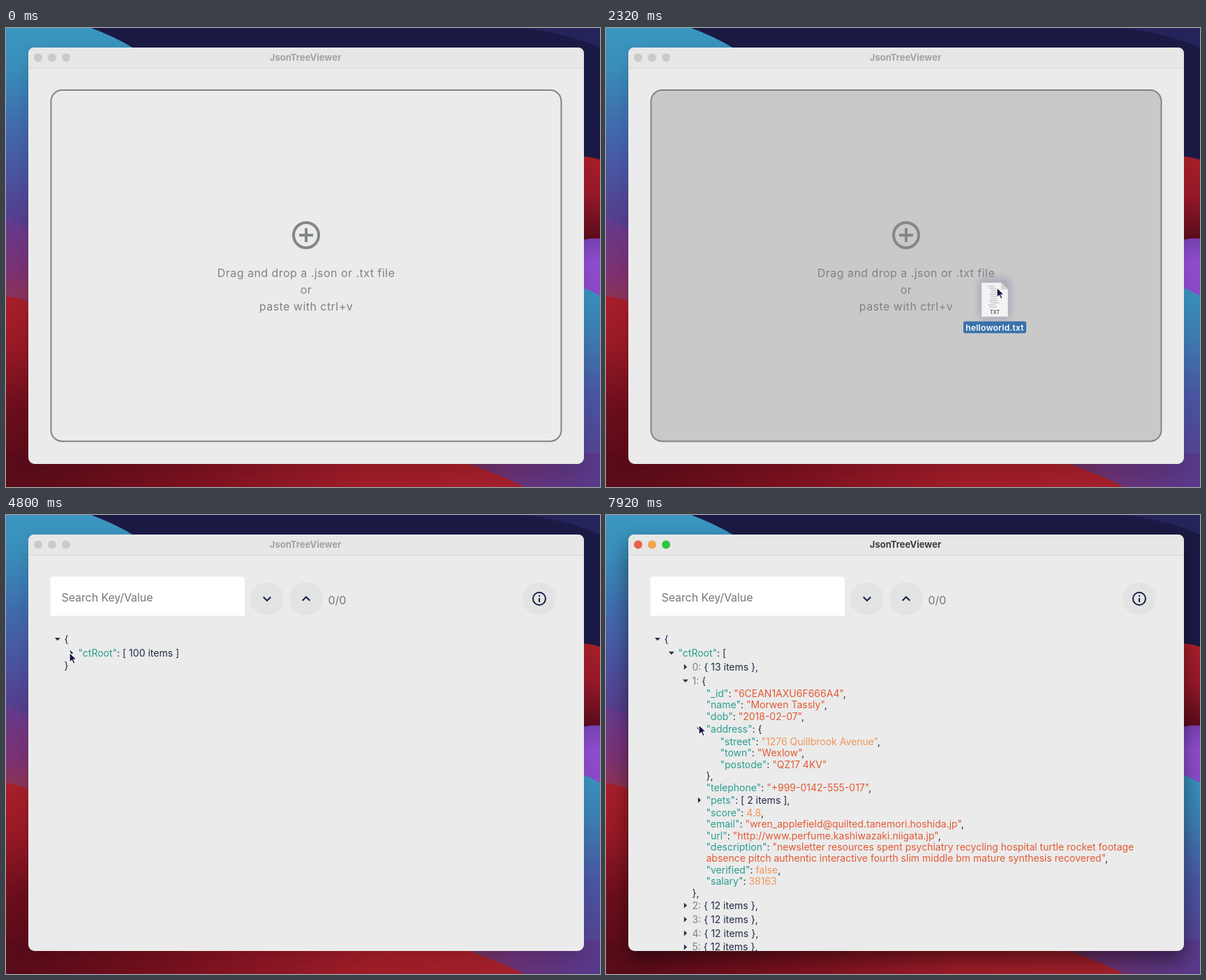
Recreate the animation shown at these times as an HTML page. Size 851 by 658 pixels, loop 8000 ms.

```html
<!DOCTYPE html>
<html lang="en">
<head>
<meta charset="utf-8">
<title>JsonTreeViewer</title>
<style>
html, body { margin: 0; width: 100%; height: 100%; overflow: hidden; background: #1b1a45; }
svg { display: block; width: 851px; height: 658px; font-family: Inter, "Open Sans", sans-serif; }
.prompt text { font-size: 16px; letter-spacing: .46px; fill: #7e8286; text-anchor: middle; }
.title { font-size: 13px; font-weight: 700; text-anchor: middle; fill: #a1a1a5; }
.light { fill: #cacaca; }
.focused .title { fill: #3d3d40; }
.focused .l0 { fill: #e8604b; }
.focused .l1 { fill: #f0a452; }
.focused .l2 { fill: #2ec63f; }
.field { font-size: 16px; fill: #74787b; letter-spacing: -.1px; }
#tree text { font-size: 14px; fill: #1f2d45; }
#tree path { fill: #22344c; }
#tree .k { fill: #2a9d8f; }
#tree .i { fill: #7b8189; }
#tree .s { fill: #e25a34; }
#tree .n { fill: #f0965a; }
.icon { fill: none; stroke: #1d1b44; stroke-width: 2; }
</style>
</head>
<body>
<svg viewBox="0 0 851 658">
  <defs>
    <linearGradient id="left" x2="0" y2="1">
      <stop offset="0" stop-color="#3a97c0"/><stop offset=".2" stop-color="#398dba"/>
      <stop offset=".44" stop-color="#3f6eae"/><stop offset=".7" stop-color="#4a53a0"/>
      <stop offset=".96" stop-color="#583b8b"/>
    </linearGradient>
    <linearGradient id="magenta" x2="0" y2="1">
      <stop offset="0" stop-color="#653b8e"/><stop offset=".6" stop-color="#7d3173"/><stop offset="1" stop-color="#90344f"/>
    </linearGradient>
    <linearGradient id="redLeft" x2="0" y2="1">
      <stop offset="0" stop-color="#a81f2a"/><stop offset=".25" stop-color="#9a1a26"/>
      <stop offset=".6" stop-color="#6b0e1c"/><stop offset="1" stop-color="#560a18"/>
    </linearGradient>
    <linearGradient id="floor">
      <stop offset="0" stop-color="#580b19"/><stop offset=".3" stop-color="#7b111f"/>
      <stop offset=".6" stop-color="#a01d29"/><stop offset="1" stop-color="#a9222d"/>
    </linearGradient>
    <linearGradient id="redRight" x2="0" y2="1">
      <stop offset="0" stop-color="#ab202a"/><stop offset=".45" stop-color="#98192a"/><stop offset="1" stop-color="#540a19"/>
    </linearGradient>
    <linearGradient id="violet" x2="0" y2="1">
      <stop offset="0" stop-color="#7742b4"/><stop offset=".4" stop-color="#914dd0"/><stop offset="1" stop-color="#8a49c6"/>
    </linearGradient>
    <linearGradient id="right" x2="0" y2="1">
      <stop offset="0" stop-color="#3995be"/><stop offset=".2" stop-color="#3c83b6"/>
      <stop offset=".55" stop-color="#4a55a2"/><stop offset="1" stop-color="#5a3b8c"/>
    </linearGradient>
    <linearGradient id="corner">
      <stop offset="0" stop-color="#74304f"/><stop offset=".4" stop-color="#6b3277"/><stop offset="1" stop-color="#573a8b"/>
    </linearGradient>
    <filter id="shade" x="-10%" y="-10%" width="120%" height="120%"><feGaussianBlur stdDeviation="14"/></filter>
    <filter id="glow" x="-50%" y="-50%" width="200%" height="200%"><feGaussianBlur stdDeviation="4"/></filter>
    <clipPath id="inside"><rect x="32" y="28" width="796" height="597" rx="9"/></clipPath>
  </defs>

  <rect width="851" height="658" fill="#1b1a45"/>
  <path d="M740 0H851V28Q800 6 740 0Z" fill="#24245a"/>
  <path d="M0 0H122Q155 12 183 29L40 300H0Z" fill="url(#left)"/>
  <path d="M0 276Q20 280 40 292V400H0Z" fill="url(#magenta)"/>
  <path d="M0 384Q20 387 40 396V658H0Z" fill="url(#redLeft)"/>
  <rect y="610" width="851" height="48" fill="url(#floor)"/>
  <path d="M820 183Q840 185 851 189V310H820Z" fill="url(#redRight)"/>
  <path d="M820 306Q836 300 851 302V390H820Z" fill="url(#violet)"/>
  <path d="M820 370Q838 376 851 384V658H820Z" fill="url(#right)"/>
  <path d="M640 618Q700 636 742 658H851V610H640Z" fill="url(#corner)"/>

  <g id="window">
    <rect id="shadow" x="32" y="42" width="796" height="597" rx="9" filter="url(#shade)"/>
    <rect x="32" y="28" width="796" height="597" rx="9" fill="#ebebeb"/>
    <path d="M32 57V37Q32 28 41 28H819Q828 28 828 37V57Z" fill="#e6e7e6"/>
    <path d="M32 57.5H828" stroke="#d7d8d8"/>
    <circle class="light l0" cx="46" cy="42.5" r="6"/>
    <circle class="light l1" cx="66" cy="42.5" r="6"/>
    <circle class="light l2" cx="86" cy="42.5" r="6"/>
    <text class="title" x="429" y="46.5">JsonTreeViewer</text>
  </g>

  <g id="drop">
    <rect id="zone" x="64.5" y="89" width="731" height="503.5" rx="16" stroke="#808487" stroke-width="2"/>
    <g class="prompt" id="prompt">
      <g fill="none" stroke="#83878a" stroke-width="4">
        <circle cx="430" cy="297" r="18"/><path d="M420 297H440M430 287V307"/>
      </g>
      <text x="430" y="356.5">Drag and drop a .json or .txt file</text>
      <text x="430" y="380.5">or</text>
      <text x="430" y="404.5">paste with ctrl+v</text>
    </g>
    <circle id="spinner" cx="430" cy="341" r="18.2" fill="none" stroke="#6f42b0" stroke-width="3.6"/>
  </g>

  <g id="viewer" clip-path="url(#inside)">
    <path d="M63.5 144.5V92Q63.5 88.5 67.5 88.5H338Q342 88.5 342 92V144.5Z" fill="#fff"/>
    <text class="field" x="79.5" y="124">Search Key/Value</text>
    <g fill="#e2e4e3"><circle cx="374" cy="120" r="24"/><circle cx="430" cy="120" r="24"/><circle cx="764" cy="120" r="24"/></g>
    <g class="icon">
      <path d="M368.7 117.5L374 122.8L379.3 117.5M424.7 122.8L430 117.5L435.3 122.8"/>
      <circle cx="764" cy="120" r="9"/><path d="M764 115V117M764 119V125"/>
    </g>
    <text class="field" x="461.5" y="127.5">0/0</text>
    <g id="tree"></g>
  </g>

  <g id="file">
    <rect x="-24" y="-8" width="48" height="62" rx="12" fill="#7c7f9c" opacity=".35" filter="url(#glow)"/>
    <path d="M-19 0H9L19 10V49H-19Z" fill="#f3f3f3" stroke="#c4c4c8" stroke-width=".6"/>
    <path d="M9 0V10H19Z" fill="#d5d5d9"/>
    <path d="M-10 5H0M-8 8H4M-6 11H3M-6 14H5M-8 17H2M-6 20H8M-6 23H3M-8 26H4M-6 29H6M-10 32H1M-8 35H3" stroke="#b4b5bb"/>
    <text y="44.5" font-size="7" font-weight="600" text-anchor="middle" fill="#55565c">TXT</text>
    <rect x="-45" y="55.5" width="90" height="17" rx="3" fill="#3872ab"/>
    <text y="68.5" font-size="12" font-weight="600" letter-spacing=".25" text-anchor="middle" fill="#fff">helloworld.txt</text>
  </g>
  <path id="cursor" d="M0 0V14.5L3.4 11.4L5.8 16.6L8.2 15.5L5.9 10.4H10.4Z" fill="#1a1840" stroke="#fff" stroke-width="1.2"/>
</svg>
<script>
const $ = id => document.getElementById(id);
const LOOP = 8000, GRAB = 1620, DROP = 2960, SPIN = 3010, LOADED = 3500;
const OPEN_ROOT = 5200, OPEN_ITEM = 6500, OPEN_ADDRESS = 7450;

// time, x, y of the pointer tip
const path = [
  [GRAB, 925, 171], [2320, 560, 372], [2900, 555, 374], [3600, 555, 374],
  [4650, 91, 197], [5300, 91, 197], [6100, 107.5, 238], [6650, 109, 238],
  [7250, 133, 300.5], [LOOP, 133, 300.5]
];
const smooth = u => u * u * (3 - 2 * u);

function pointer(t) {
  let n = 1;
  while (n < path.length - 1 && t > path[n][0]) n++;
  const [a, x, y] = path[n - 1], [b, x2, y2] = path[n];
  let u = Math.min(1, Math.max(0, (t - a) / (b - a)));
  if (n > 1) u = smooth(u);
  return [x + (x2 - x) * u, y + (y2 - y) * u];
}

const span = (cls, s) => `<tspan class="${cls}">${s}</tspan>`;
const key = s => span('k', `"${s}"`) + ': ';
const str = (k, v, end = ',', cls = 's') => key(k) + span(cls, `"${v}"`) + end;
const num = (k, v, end = ',') => key(k) + span('n', v) + end;

function tree(level) {
  let y = 168, out = '';
  const leaf = (depth, html, h = 16.4) => {
    out += `<text x="${83.5 + depth * 20}" y="${y + h / 2 + 5}">${html}</text>`;
    y += h;
  };
  const node = (depth, html, open) => {
    const x = 73.8 + depth * 20, cy = y + 9.95;
    out += open ? `<path d="M${x - 4} ${cy - 2}h8l-4 4.3z"/>` : `<path d="M${x - 2} ${cy - 4}v8l4.3 -4z"/>`;
    leaf(depth, html, 19.9);
  };
  node(0, '{', true);
  if (!level) node(1, key('ctRoot') + '[ 100 items ]');
  else {
    node(1, key('ctRoot') + '[', true);
    for (let i = 0; i < 100 && y < 625; i++) {
      const open = i == 1 && level > 1;
      node(2, span('i', i + ':') + (open ? ' {' : ` { ${i ? 12 : 13} items },`), open);
      if (open) {
        item(leaf, node, level > 2);
        leaf(2, '},');
      }
    }
  }
  if (y < 625) leaf(0, '}');
  return out;
}

function item(leaf, node, address) {
  leaf(3, str('_id', '6CEAN1AXU6F666A4'));
  leaf(3, str('name', 'Morwen Tassly'));
  leaf(3, str('dob', '2018-02-07'));
  node(3, key('address') + (address ? '{' : '{ 3 items },'), address);
  if (address) {
    leaf(4, str('street', '1276 Quillbrook Avenue', ',', 'n'));
    leaf(4, str('town', 'Wexlow'));
    leaf(4, str('postode', 'QZ17 4KV', ''));
    leaf(3, '},');
  }
  leaf(3, str('telephone', '+999-0142-555-017'));
  node(3, key('pets') + '[ 2 items ],');
  leaf(3, num('score', '4.8'));
  leaf(3, str('email', 'wren_applefield@quilted.tanemori.hoshida.jp'));
  leaf(3, str('url', 'http://www.perfume.kashiwazaki.niigata.jp'));
  leaf(3, key('description') + span('s', '"newsletter resources spent psychiatry recycling hospital turtle rocket footage'));
  leaf(3, span('s', 'absence pitch authentic interactive fourth slim middle bm mature synthesis recovered"') + ',');
  leaf(3, num('verified', 'false'));
  leaf(3, num('salary', '38163', ''));
}

const show = (id, on) => $(id).style.display = on ? '' : 'none';
const trees = [0, 1, 2, 3].map(tree);
let shown = -1;

function draw(t) {
  const [x, y] = pointer(t), dragging = t >= GRAB && t < DROP, focused = t >= OPEN_ROOT;
  show('drop', t < LOADED);
  show('viewer', t >= LOADED);
  show('prompt', t < DROP);
  show('spinner', t >= SPIN);
  show('file', dragging);
  show('cursor', t >= GRAB);
  $('cursor').setAttribute('transform', `translate(${x} ${y})`);
  $('file').setAttribute('transform', `translate(${x - 3} ${y - 7})`);
  $('zone').setAttribute('fill', dragging && x < 796 ? '#c9c9ca' : '#ebebeb');
  $('window').setAttribute('class', focused ? 'focused' : '');
  $('shadow').setAttribute('opacity', focused ? .45 : .12);

  const turn = Math.max(0, t - SPIN) / 1400;
  $('spinner').setAttribute('transform', `rotate(${360 * turn - 90} 430 341)`);
  $('spinner').setAttribute('stroke-dasharray', `${3 + 88 * smooth(Math.min(1, turn * 2))} 200`);

  const level = [OPEN_ROOT, OPEN_ITEM, OPEN_ADDRESS].filter(s => t >= s).length;
  if (level != shown) $('tree').innerHTML = trees[shown = level];
}

const start = performance.now();
function tick() {
  draw((performance.now() - start) % LOOP);
  requestAnimationFrame(tick);
}
tick();
</script>
</body>
</html>
```
